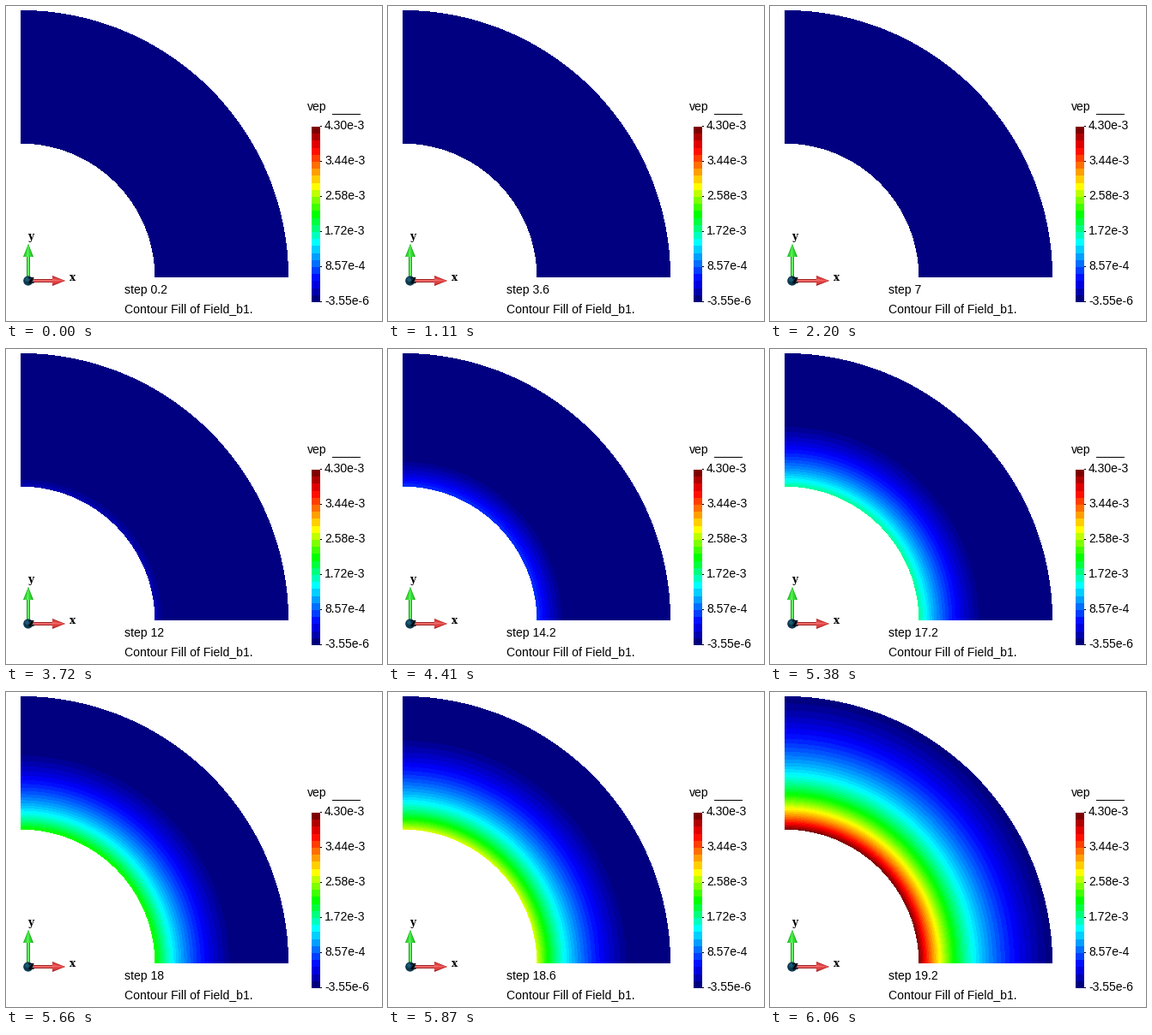
Write a matplotlib script that moves like this. It is 438 by 368 pixels and loops after 6.33 s.

```python
import numpy as np
import matplotlib.pyplot as plt
from matplotlib.animation import FuncAnimation
from matplotlib.patches import Circle, Polygon, Rectangle

W, H, DPI = 438, 368, 64
LOOP, TICK = 6330, 15
PT = 72 / DPI  # points per pixel

# Quarter ring, in pixels
CX, CY = 17, 317
R_IN, R_OUT = 156.3, 312.1
X0, X1, Y0, Y1 = 17, 331, 4, 317

BANDS = 50
LIMIT_LOAD = 19.2

# Playback: time -> picture index -> count of 0.2 load steps
TIMES = [0, 750, 1450, 2130, 2810, 3510, 4200, 4890, 5590, 6060]
PICTURES = [0, 11, 21, 31, 41, 51, 61, 71, 81, 88]
KEY_PICTURES = [0, 32, 54, 71, 78, 82, 88]
KEY_COUNTS = [1, 35, 60, 78, 86, 90, 96]

# Navy, blue, cyan, green, yellow, red, maroon
STOPS = [0, 1 / 9, 1 / 3, 1 / 2, 2 / 3, 8 / 9, 1]
RED = [0, 0, 0, 0, 1, 1, 0.5]
GREEN = [0, 0, 1, 1, 1, 0, 0]
BLUE = [0.5, 1, 1, 0, 0, 0, 0]


def rainbow(v):
    return np.stack([np.interp(v, STOPS, c) for c in (RED, GREEN, BLUE)], axis=-1)


fig = plt.figure(figsize=(W / DPI, H / DPI), dpi=DPI, facecolor="white")
ax = fig.add_axes([0, 0, 1, 1])
ax.axis("off")


def label(x, y, text, size=14, **kw):
    kw.setdefault("family", "Liberation Sans")
    return ax.text(x, y, text, fontsize=size * PT, color="black",
                   va="baseline", ha="left", **kw)


def rect(x, y, w, h, color):
    ax.add_patch(Rectangle((x, y), w, h, fc=color, ec="none", lw=0,
                           antialiased=False))


def poly(points, color):
    ax.add_patch(Polygon(points, closed=True, fc=color, ec="none", lw=0))


def picture_box(data, x0, x1, y0, y1):
    return ax.imshow(data, extent=(x0, x1, y1, y0), interpolation="nearest",
                     aspect="auto")


# Ring field
px, py = np.meshgrid(np.arange(X0, X1) + 0.5, np.arange(Y0, Y1) + 0.5)
radius = np.hypot(px - CX, py - CY)
inside = (radius >= R_IN) & (radius <= R_OUT)
inv_sq = (R_IN / np.maximum(radius, R_IN)) ** 2
palette = np.round(255 * rainbow(np.arange(BANDS) / (BANDS - 1))).astype(np.uint8)

# Plastic front of a thick cylinder (outer radius twice the inner) against load
front = np.linspace(1, 2, 2000)
front_load = LIMIT_LOAD * (2 * np.log(front) + 1 - front ** 2 / 4) / (2 * np.log(2))


def ring_image(step):
    c = np.interp(step, front_load, front)
    strain = (c * c * inv_sq - 1) / 3
    band = np.clip(np.floor(strain * BANDS), 0, BANDS - 1).astype(int)
    out = np.full(radius.shape + (3,), 255, np.uint8)
    out[inside] = palette[band[inside]]
    return out


ring = picture_box(ring_image(0), X0, X1, Y0, Y1)

# Legend
label(351, 122, "vep")
rect(380, 126, 33, 1, "black")
BAR_TOP, BAR_H, BAR_BLOCKS = 141, 205, 25
bar = rainbow(np.linspace(1, 0, BAR_BLOCKS))[:, None, :]
picture_box(bar, 356, 366, BAR_TOP, BAR_TOP + BAR_H)
for i, text in enumerate(["4.30e-3", "3.44e-3", "2.58e-3", "1.72e-3",
                          "8.57e-4", "-3.55e-6"]):
    y = BAR_TOP + i * BAR_H / 5
    rect(366, y - 1, 2, 1, "black")
    label(371, y + 3, text)

ax.set_xlim(0, W)
ax.set_ylim(H, 0)

# Axis arrows
DARK_G, MID_G, LIGHT_G = "#1fa01f", "#30dc30", "#62f062"
rect(24, 291, 4, 26, DARK_G)
rect(25, 291, 2, 26, LIGHT_G)
poly([(26, 278), (20, 293), (32, 293)], DARK_G)
poly([(26, 278), (21, 293), (30.5, 293)], MID_G)
poly([(26, 278), (24, 293), (26.5, 293)], LIGHT_G)

DARK_R, MID_R, LIGHT_R = "#a02424", "#e04040", "#f06a6a"
rect(30, 319, 25, 4, DARK_R)
rect(30, 320, 25, 2, LIGHT_R)
poly([(69, 321), (54, 315), (54, 327)], DARK_R)
poly([(69, 321), (54, 316), (54, 325.5)], MID_R)
poly([(69, 321), (54, 319), (54, 321.5)], LIGHT_R)

ax.add_patch(Circle((25.8, 321), 5.6, fc="#0c3a50", ec="none"))
ax.add_patch(Circle((24.5, 319.5), 2.4, fc="#1c5a74", ec="none"))
for x, y, name in [(25.5, 273, "y"), (73.5, 321, "x"), (26, 324.5, "z")]:
    label(x, y, name, 12, family="DejaVu Serif", weight="bold")

# Captions
step_text = label(137.5, 336, "step 0.2")
label(137.5, 358, "Contour Fill of Field_b1.")

shown = {"step": None}


def load_step(t):
    picture = int(np.interp(t, TIMES, PICTURES) + 1e-6)
    count = round(float(np.interp(picture, KEY_PICTURES, KEY_COUNTS)))
    return round(0.2 * count, 1)


def draw(k):
    step = load_step(k * TICK + 10)
    if step != shown["step"]:
        shown["step"] = step
        ring.set_data(ring_image(step))
        step_text.set_text(f"step {step:g}")
    return ring, step_text


def reset():
    shown["step"] = None
    return draw(0)


anim = FuncAnimation(fig, draw, frames=LOOP // TICK, init_func=reset,
                     interval=TICK, repeat=True, repeat_delay=0, blit=False)
plt.show()
```
